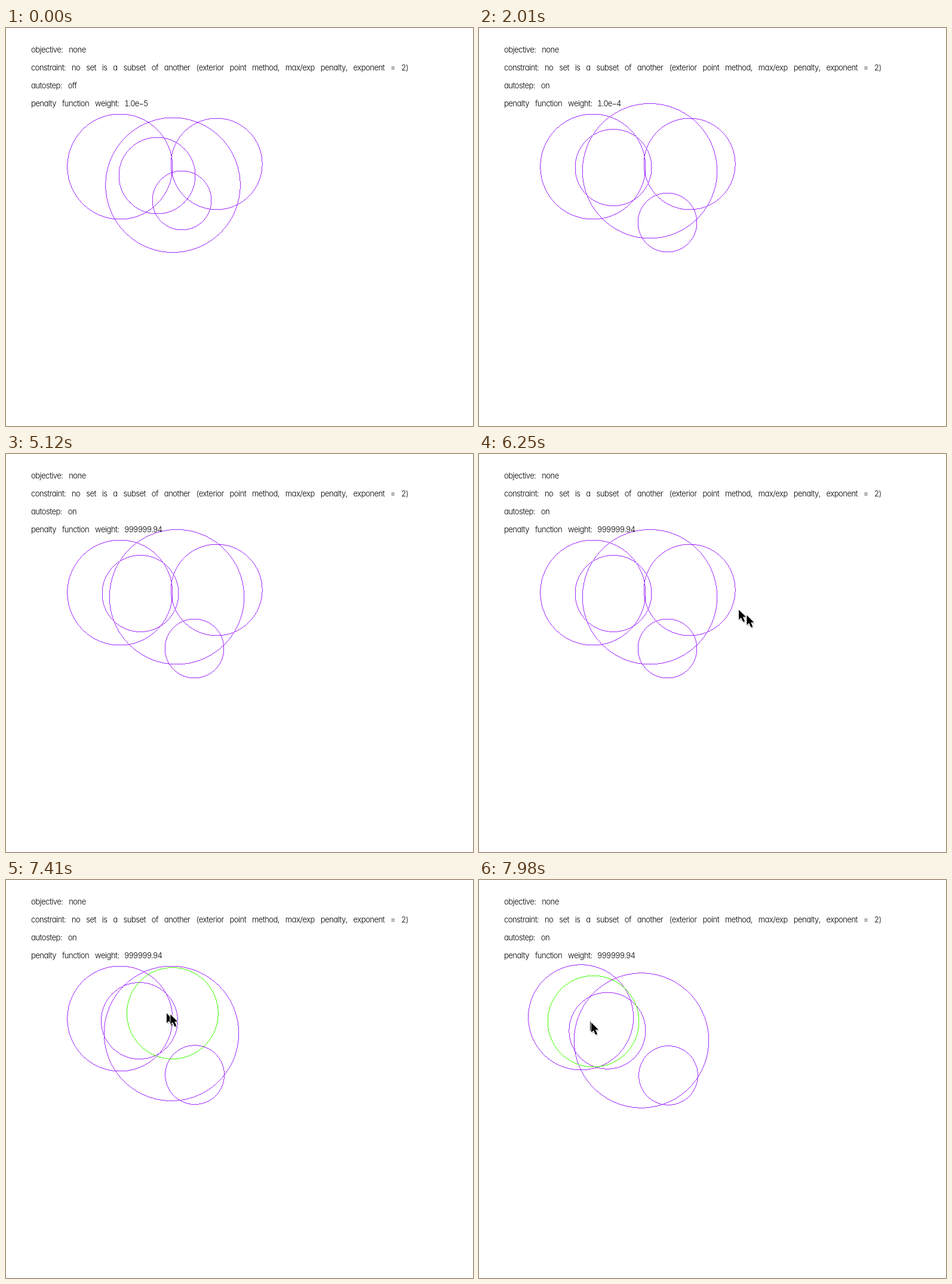
Animation of 782x666 px, one loop 8 s. Source, as an HTML page with a canvas:

```html
<!DOCTYPE html>
<html lang="en">
<head>
<meta charset="utf-8">
<title>Circle constraints</title>
<style>
  html, body { margin: 0; width: 100%; height: 100%; overflow: hidden; background: #fff; }
  canvas, svg { position: absolute; left: 0; top: 0; display: block; }
  text {
    font: 300 13px Inter, Lato, sans-serif;
    font-feature-settings: "cv11", "tnum";
    letter-spacing: -0.5px;
    word-spacing: 6.9px;
    fill: #000;
  }
  #weight { letter-spacing: -0.85px; }
</style>
</head>
<body>
<canvas id="board" width="782" height="666"></canvas>
<svg width="782" height="666" viewBox="0 0 782 666">
  <defs>
    <g id="arrow">
      <path d="M1.5 3v16l3.6-3.4 3 7 3-1.2-3-6.9h5z" opacity=".28"/>
      <path d="M0 0v16.6l3.9-3.6 3.2 7.4 3-1.3-3.2-7.2h5.2z" stroke="#fff" stroke-width="2" paint-order="stroke"/>
    </g>
  </defs>
  <text x="42" y="41">objective: none</text>
  <text x="42" y="71">constraint: no set is a subset of another (exterior point method, max/exp penalty, exponent = 2)</text>
  <text x="42" y="101">autostep: <tspan id="state"></tspan></text>
  <text x="42" y="131">penalty function weight:</text>
  <text id="weight" x="198" y="131"></text>
  <g id="cursor">
    <use id="lead" href="#arrow"/>
    <use id="trail" href="#arrow"/>
  </g>
</svg>
<script>
const LOOP = 8000, STEP = 57;
const APPEAR = 5840, APPROACH = 6077, GRAB = 7067, DROP = 7637, END = 7979;
const PURPLE = '#a02bff', GREEN = '#40ff00';
const $ = id => document.getElementById(id);
const ctx = $('board').getContext('2d');

// Each move: start, end, dx, dy
const dragged = {
  r: 76.4, x: 352.7, y: 227.5,
  moves: [[GRAB, 7181, -18.5, -4.5], [7181, DROP, -110.7, 0], [DROP, END, -32, 13.5]]
};
const circles = [
  { r: 88, x: 190.8, y: 232, moves: [[7466, DROP, -10.2, -0.5], [7865, END, -10, -1.7]] },
  { r: 64, x: 253, y: 247, moves: [[0, 90, -28, -13.5], [7352, DROP, -8, 10.5], [DROP, END, -2.1, 8.2]] },
  { r: 112.7, x: 279.5, y: 262.8, moves: [[0, 90, 6.5, -23.6], [7238, 7523, -15, 29.3], [DROP, 7865, 1, 0]] },
  { r: 49.4, x: 294.5, y: 288.5, moves: [[0, 90, 21, 37], [7238, 7523, 1, 1], [DROP, 7865, 0.5, 0.5]] },
  dragged
];

const clamp = v => Math.max(0, Math.min(1, v));

function place({ x, y, moves }, t) {
  for (const [from, to, dx, dy] of moves) {
    let p = clamp((t - from) / (to - from));
    if (from === 0) p *= 2 - p;
    x += dx * p;
    y += dy * p;
  }
  return [x, y];
}

// One-pixel outline without smoothing
function outline(cx, cy, r, color) {
  ctx.fillStyle = color;
  const reach = r * Math.SQRT1_2;
  const scan = (a, b, plot) => {
    for (let i = Math.floor(a - reach); i <= a + reach; i++) {
      const h = Math.sqrt(r * r - (i + 0.5 - a) ** 2);
      plot(i, Math.floor(b - h));
      plot(i, Math.floor(b + h));
    }
  };
  scan(cx, cy, (x, y) => ctx.fillRect(x, y, 1, 1));
  scan(cy, cx, (y, x) => ctx.fillRect(x, y, 1, 1));
}

// The weight grows tenfold in single precision at each of these times
const growth = [2010, 2610, 3210, 3510, 3810, 4110, 4290, 4530, 4700, 4940, 5120];

function weightAt(t) {
  let w = Math.fround(1e-5);
  for (const g of growth) if (t >= g) w = Math.fround(w * 10);
  return w;
}

// Fewest digits that still give back the same single-precision number
function format(w) {
  let n = 1;
  while (Math.fround(+w.toPrecision(n)) !== w) n++;
  if (w >= 0.1) return String(+w.toPrecision(n));
  return w.toExponential(Math.max(1, n - 1)).replace('-', '\u2212');
}

function pointer(t) {
  if (t >= GRAB) {
    const [x, y] = place(dragged, t);
    return [x - 6, y - 0.5];
  }
  if (t < 5900) return [674, 443];
  const age = Math.max(0, t - APPROACH);
  return [345 + 313 * Math.exp(-age / 151), 221 + 222 * Math.exp(-age / 109)];
}

// The picture refreshes in steps while things move
function snap(t) {
  if (t < APPROACH) return [5900, APPEAR, 150, 60, 0].find(s => s <= t);
  const from = t < GRAB ? APPROACH : GRAB;
  return from + STEP * Math.floor((t - from) / STEP);
}

function moveTo(id, [x, y], shift) {
  $(id).setAttribute('transform', `translate(${x + shift} ${y + shift})`);
}

function draw(t) {
  const q = snap(t);
  $('state').textContent = t < 60 ? 'off' : 'on';
  $('weight').textContent = format(weightAt(t));

  ctx.clearRect(0, 0, 782, 666);
  for (const c of circles)
    outline(...place(c, q), c.r, c === dragged && t >= GRAB ? GREEN : PURPLE);

  $('cursor').setAttribute('visibility', t < APPEAR ? 'hidden' : 'visible');
  moveTo('lead', pointer(q + 18), 0.5);
  moveTo('trail', pointer(q), 2.5);
}

const start = performance.now();
function tick() {
  draw((performance.now() - start) % LOOP);
  requestAnimationFrame(tick);
}
tick();
</script>
</body>
</html>
```
